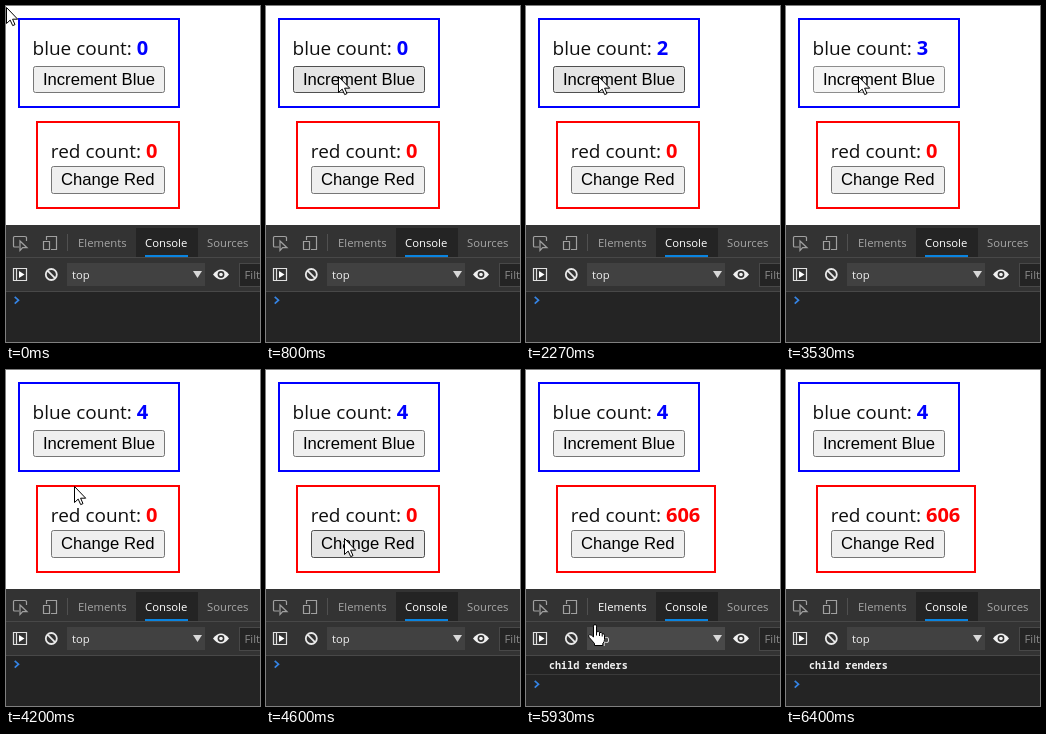
An HTML page for the animation above (6740 ms loop, 254 px wide and 336 px high).

```html
<!DOCTYPE html>
<html lang="en">
<head>
<meta charset="utf-8">
<title>Render counter</title>
<style>
  html, body { margin: 0; width: 100%; height: 100%; overflow: hidden; background: #fff; }
  svg { display: block; }
  rect { shape-rendering: crispEdges; }
  .label { font: 19px "Open Sans", "Noto Sans", sans-serif; fill: #111; }
  .count { font: bold 20px "Open Sans", "Noto Sans", sans-serif; }
  .btn rect { fill: #efefef; stroke: #767676; shape-rendering: auto; }
  .btn text { font: 16.667px "Liberation Sans", Arial, sans-serif; }
  .btn.hover rect { fill: #e5e5e5; stroke: #4f4f4f; }
  .btn.down rect { fill: #f5f5f5; stroke: #8d8d8d; }
  .ui { font: 11.3px "Open Sans", "Noto Sans", sans-serif; fill: #a6a6a6; }
  .ui .lit { fill: #fff; }
  .log { font: bold 10.1px "Noto Sans Mono", "DejaVu Sans Mono", monospace; fill: #f0f0f0; }
  .icon { fill: none; stroke: #a0a0a0; stroke-width: 1.2; }
  .pointer { fill: #fff; stroke: #000; stroke-linejoin: round; }
</style>
</head>
<body>
<svg width="254" height="336" viewBox="0 0 254 336">
  <rect x="13" y="13" width="160" height="88" fill="none" stroke="#00f" stroke-width="2"/>
  <text class="label" x="26.5" y="49">blue count:</text>
  <text class="count" id="blueCount" x="130.7" y="49" fill="#00f">0</text>
  <g class="btn" id="blueBtn">
    <rect x="27.5" y="60.5" width="131" height="26" rx="2"/>
    <text x="36.9" y="79">Increment Blue</text>
  </g>

  <rect id="redBox" x="31" y="116" width="142" height="86" fill="none" stroke="#f00" stroke-width="2"/>
  <text class="label" x="44.8" y="152">red count:</text>
  <text class="count" id="redCount" x="140" y="152" fill="#f00">0</text>
  <g class="btn" id="redBtn">
    <rect x="45.5" y="160.5" width="113" height="27" rx="2"/>
    <text x="55" y="179">Change Red</text>
  </g>

  <rect y="219" width="254" height="117" fill="#242424"/>
  <rect y="219" width="254" height="66" fill="#333"/>
  <rect y="251" width="254" height="1" fill="#484848"/>
  <rect x="130" y="222" width="62" height="29" fill="#242424"/>
  <rect x="139" y="249" width="43" height="2" fill="#0a84e0"/>
  <rect y="285" width="254" height="1" fill="#484848"/>
  <rect x="61" y="228" width="1" height="17" fill="#505050"/>

  <g class="icon">
    <path d="M13 241H8.5Q7.500 241 7.500 240V231.500Q7.500 230.500 8.500 230.500H19Q20.500 230.500 20.500 231.500V235"/>
    <path d="M14 235V244.500L16.700 241.700H21Z"/>
    <path d="M40.500 234V230.500H50.500V243.500H45M37.500 235.500H43.500V243.500H37.500Z"/>
    <path d="M7.500 262.500H20.500V274.500H7.500ZM10.500 262.500V274.500" stroke="#e0e0e0"/>
    <path d="M13 265V272L18.500 268.500Z" fill="#fff" stroke="none"/>
    <path d="M39.800 268.500A5.500 5.500 0 1 0 50.800 268.500A5.500 5.500 0 1 0 39.800 268.500M41.500 264.600L49.200 272.400" stroke="#e8e8e8" stroke-width="1.800"/>
  </g>

  <rect id="picker" x="61" y="257" width="138" height="23" fill="#414141"/>
  <path d="M187 265H196L191.500 272Z" fill="#d8d8d8"/>
  <path d="M207 268.500Q215 258.500 223 268.500Q215 278.500 207 268.500Z" fill="#f0f0f0"/>
  <circle cx="215" cy="268.500" r="3.400" fill="#333"/>
  <circle cx="215" cy="268.500" r="1.800" fill="#f0f0f0"/>
  <rect x="233.500" y="257.500" width="30" height="23" fill="#242424" stroke="#484848"/>

  <g class="ui">
    <text id="elements" x="72" y="241">Elements</text>
    <text class="lit" x="139" y="241">Console</text>
    <text x="201" y="241">Sources</text>
    <text x="66" y="272.500" fill="#eee">top</text>
    <text x="238.500" y="272.500" fill="#8c8c8c">Filter</text>
  </g>

  <g id="log" visibility="hidden">
    <text class="log" x="23" y="298.500">child renders</text>
    <rect y="304" width="254" height="1" fill="#3a3a3a"/>
  </g>
  <path id="prompt" d="M8.700 290.800L12.500 294.200L8.700 297.600" fill="none" stroke="#3584e4" stroke-width="1.700"/>

  <path id="arrow" class="pointer" d="M.5 .5V16.500L4.200 13.100L6.700 18.600L9 17.600L6.600 12.200H11.700Z"/>
  <g id="hand" class="pointer" visibility="hidden">
    <path d="M5.500 13V2.200Q5.500 .5 7 .5T8.500 2.200V8Q11 6.300 11.500 8.700Q13.700 7.500 14.200 9.700Q16.500 9 16.500 11.500V15.500Q16.500 18 14.800 19.500V21.500H6.500V19.500L1 13.200Q0 11.500 1.500 10.700Q3 10.200 5.500 13Z"/>
    <path d="M8.500 8V11.500M11.500 8.700V12M14.200 9.700V12.500" fill="none"/>
  </g>
</svg>
<script>
const LOOP = 6740, TICK = 1000 / 15;
const el = id => document.getElementById(id);
const show = (id, on) => el(id).setAttribute('visibility', on ? 'visible' : 'hidden');

// Tick, x, y and the easing used to arrive there
const smooth = p => p * p * (3 - 2 * p);
const easeIn = p => p ** 1.3;
const easeOut = p => 1 - (1 - p) ** 1.3;
const linear = p => p;
const path = [
  [0, 0, 1, linear],
  [12, 72, 70, smooth],
  [59, 72, 70, linear],
  [63, 68, 116, easeIn],
  [71, 80, 178, easeOut],
  [84, 80, 178, linear],
  [89, 69, 254, easeIn],
  [95, 58, 330, easeOut]
];
const blueClicks = [[20, 22], [32, 34], [42, 44], [53, 55]];
const redClick = [72, 74];

function pointerAt(n) {
  const i = path.findIndex(k => n <= k[0]);
  if (i < 0) return null;
  if (i === 0) return [path[0][1], path[0][2]];
  const [t0, x0, y0] = path[i - 1], [t1, x1, y1, ease] = path[i];
  const p = ease((n - t0) / (t1 - t0));
  return [Math.round(x0 + (x1 - x0) * p), Math.round(y0 + (y1 - y0) * p)];
}

function draw(n) {
  const pos = pointerAt(n);
  const over = (x0, y0, x1, y1) =>
    !!pos && pos[0] >= x0 && pos[0] < x1 && pos[1] >= y0 && pos[1] < y1;
  const held = ([down, up]) => n >= down && n < up;
  const setButton = (id, hover, down) => {
    el(id).classList.toggle('hover', hover);
    el(id).classList.toggle('down', down);
  };

  setButton('blueBtn', over(27, 60, 159, 87), blueClicks.some(held));
  setButton('redBtn', over(45, 160, 159, 188), held(redClick));
  el('blueCount').textContent = blueClicks.filter(c => n >= c[1]).length;

  const changed = n >= redClick[1];
  el('redCount').textContent = changed ? 606 : 0;
  el('redBox').setAttribute('width', changed ? 158 : 142);
  show('log', changed);
  el('prompt').setAttribute('transform', `translate(0 ${changed ? 20 : 0})`);

  const picking = over(61, 252, 199, 281);
  el('picker').setAttribute('fill', picking ? '#494949' : '#414141');
  el('elements').classList.toggle('lit', over(62, 222, 130, 256));
  show('arrow', pos && !picking);
  show('hand', picking);
  if (pos) {
    el('arrow').setAttribute('transform', `translate(${pos})`);
    el('hand').setAttribute('transform', `translate(${pos[0] - 7} ${pos[1]})`);
  }
}

function frame() {
  const t = performance.now() % LOOP;
  draw(Math.floor((t + 4) / TICK));
  requestAnimationFrame(frame);
}
frame();
</script>
</body>
</html>
```
